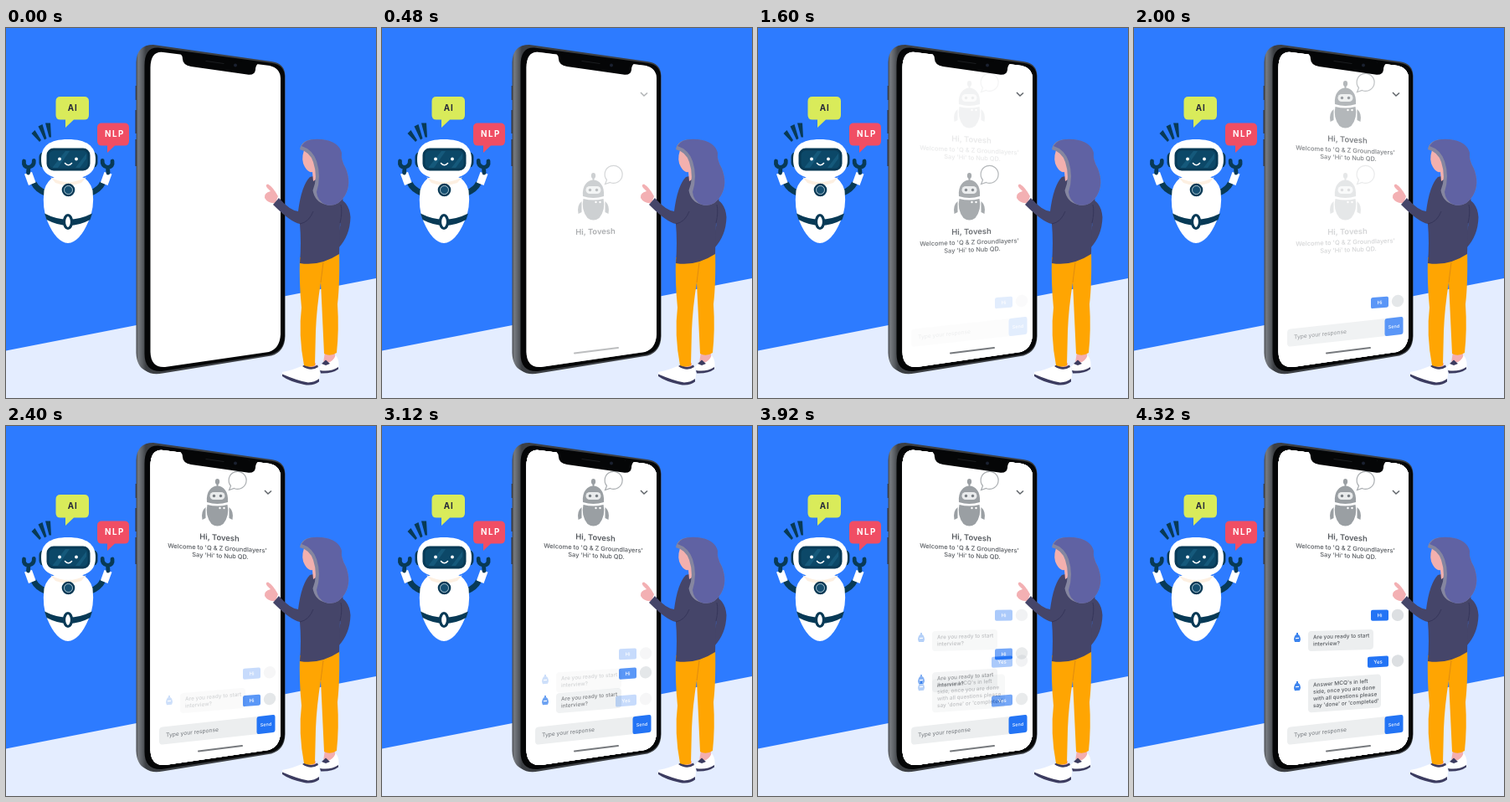
Write an HTML page that moves like this. It is 442 by 442 pixels and loops after 4.4 s.

```html
<!DOCTYPE html>
<html lang="en">
<head>
<meta charset="utf-8">
<title>Chat assistant</title>
<style>
html, body { margin: 0; width: 100%; height: 100%; overflow: hidden; background: #2d7bff; }
svg { display: block; width: 100%; height: 100%; }
text { font-family: Inter, "Open Sans", sans-serif; }
</style>
</head>
<body>
<svg viewBox="0 0 442 442">
  <defs>
    <linearGradient id="side" gradientUnits="userSpaceOnUse" x1="155" x2="167">
      <stop offset="0" stop-color="#3a3d41"/>
      <stop offset=".25" stop-color="#777b80"/>
      <stop offset=".65" stop-color="#5b5f64"/>
      <stop offset="1" stop-color="#3c3f43"/>
    </linearGradient>
  </defs>

  <rect width="442" height="442" fill="#2d7bff"/>
  <path d="M0 385.500L442 299V442H0Z" fill="#e4edff"/>

  <!-- speech tags -->
  <path d="M65 82H93.500Q99 82 99 87.500V104Q99 109.500 93.500 109.500H81L71 119V109.500H65Q59.500 109.500 59.500 104V87.500Q59.500 82 65 82Z" fill="#d9eb5a"/>
  <text x="79.800" y="99.300" font-size="9.800" font-weight="700" fill="#26283a" text-anchor="middle" letter-spacing="1">AI</text>
  <path d="M114.500 113.500H141.500Q147 113.500 147 119V135Q147 140.500 141.500 140.500H130L121 149V140.500H114.500Q109 140.500 109 135V119Q109 113.500 114.500 113.500Z" fill="#f04e64"/>
  <text x="129.900" y="130.400" font-size="9.800" font-weight="700" fill="#fff" text-anchor="middle" letter-spacing="1.400">NLP</text>

  <!-- white robot -->
  <path d="M30.500 126L34.500 122L42 134L40 136ZM38.500 117.500L43.500 115L48.500 132L46 133.500ZM47 113.500H53L54 130.500H51.500Z" fill="#083a56"/>
  <g id="arm">
    <path d="M33 185Q37 193 47 197" fill="none" stroke="#083a56" stroke-width="7"/>
    <path d="M22 174.500L31 172L35.500 184.500L27 188Z" fill="#fff"/>
    <path d="M26.500 173L27 167M21.500 159Q20.500 165.500 27 166.500Q34 165 33.300 158.500" fill="none" stroke="#083a56" stroke-width="4.800" stroke-linecap="round"/>
  </g>
  <use href="#arm" transform="matrix(-1 0 0 1 148.500 0)"/>
  <path d="M60 177H89Q100 181 103.500 194Q106 216 98.500 231Q88 256 74 257Q60 256 49.500 231Q43 216 45.500 194Q49 181 60 177Z" fill="#fff"/>
  <path d="M53 178Q74 190 96 178L90 185Q74 191 59 185Z" fill="#fdf0e2"/>
  <path d="M46 221.500Q74 236 103 221.500L100.500 229Q75 243 48.500 229Z" fill="#083a56"/>
  <ellipse cx="74" cy="231.500" rx="4.500" ry="8" fill="#fff" stroke="#083a56" stroke-width="3.200"/>
  <circle cx="74.500" cy="193.500" r="7.800" fill="#083a56"/>
  <circle cx="74.500" cy="193.500" r="5" fill="#164f70" stroke="#a9c4d1" stroke-width="1"/>
  <rect x="39.500" y="148" width="70" height="19" rx="6" fill="#083a56"/>
  <path d="M74 133C96 133 107 141 107 157C107 173 97 180 74 180C51 180 42 173 42 157C42 141 52 133 74 133Z" fill="#fff"/>
  <rect x="50" y="145" width="49" height="24" rx="7" fill="#0c4868" stroke="#083a56" stroke-width="3"/>
  <path d="M56 166L71 147H76L62 167H56ZM83 167L96 150V156L88 167Z" fill="#2b83a6" opacity=".3"/>
  <g fill="#fff"><circle cx="64" cy="156.500" r="1.900"/><circle cx="84" cy="156.500" r="1.900"/></g>
  <path d="M70.500 161.500Q74.500 166 78.500 161.500" fill="none" stroke="#fff" stroke-width="1.600" stroke-linecap="round"/>

  <!-- phone -->
  <path d="M154.700 69H158V86H154.700ZM154.500 98H158V126H154.500ZM154.500 133H158V165H154.500Z" fill="#303338"/>
  <path d="M155.500 41Q156 20 176 20L317 40Q333 42 333.500 57V368Q333 387 317 391.500L187 412.500Q174 415 166 409Q156 404 155.500 388Z" fill="url(#side)"/>
  <path d="M165.500 45Q165.500 22.500 182 23.500L318 42Q332.500 44 333 58V368Q332 386 316 390L186 410Q165.500 411 165.500 389Z" fill="#050607"/>
  <g id="screen"></g>
  <path d="M208 30L301 42.500Q298 45 298 50Q297 57 288 55.500L221 46Q211 44 211 37Q211 33.500 208 30Z" fill="#050607"/>
  <path d="M239 39.500L260 42.500" stroke="#1b1d20" stroke-width="1.200" stroke-linecap="round"/>
  <circle cx="274" cy="44.500" r="2" fill="#1b2130"/>

  <!-- woman -->
  <path d="M394 203Q410 206 411.500 226Q411 248 397 263L391 256Q401 242 399 229Z" fill="#454569"/>
  <path d="M358 401L357 412H370L370 400ZM381 387L379 400H393L393 387Z" fill="#f3aeb0"/>
  <path d="M374 405L380 398Q388 403 394 391Q399 398 397 407Q390 413 376 411Z" fill="#fff"/>
  <path d="M375 409Q388 411 397 405V407.500Q390 413 376 412.500ZM377 401L382 396.500L387 401L382 403Z" fill="#3c3c60"/>
  <path d="M330 411Q345 408 355 403Q365 410 373 403Q377 415 373 423Q366 428 355 425Q340 422 330 415Z" fill="#fff"/>
  <path d="M330 413.500Q350 422 361 423.500Q369 423 374 419V422.500Q367 428 356 426Q338 422 330 416ZM354 404L358 401.500Q363 408 372 402.500L373 405Q364 411 354 404Z" fill="#3c3c60"/>
  <path d="M351 274L398 264Q399 304 396 330Q398 360 395 388Q387 393 380 389L376 304Q371 335 370 362L369 403Q363 406 356 403Q349 366 353 334Q350 304 351 274Z" fill="#ffa502"/>
  <path d="M376 304L379 280" stroke="#df8b10" stroke-width="1"/>
  <path d="M325 201Q319 190 313 186.500Q309 187 312 191L316 195Q308 197 309 203Q313 210 322 209Z" fill="#f3b0b3"/>
  <path d="M363 178Q381 173 400 196Q406 210 399 233L398 270Q375 285 351 281Q353 256 351 234Q340 232 319 211L326 203Q339 218 349 219Q353 188 363 178Z" fill="#454569"/>
  <path d="M351 234Q362 232 367 219M399 233Q402 220 400 211" fill="none" stroke="#36365a" stroke-width="1"/>
  <path d="M356 146Q352 158 357 166Q361 173 366 172L367 183L378 176L375 145Z" fill="#f3b0ae"/>
  <path d="M351 145Q353 132 372 133Q393 133 400 147Q400 158 406 168Q413 186 405 200Q396 215 382 211Q369 208 366.500 194Q373 178 367 160Q363 148 351 145Z" fill="#8586a0"/>
  <path d="M353 141Q358 131 377 133Q397 135 401 149Q400 158 406 168Q413 186 405 200Q396 215 382 211Q372 207 371 196Q377 177 371 159Q366 145 353 141Z" fill="#6062a3"/>
</svg>
<script>
const STEP = 80, LOOP = 4400, STAGE = 9, FADE = 8;
const BLUE = '#2374f5', INK = '#565a5f';
const screen = document.getElementById('screen');

const rect = (x, y, w, h, r, fill) =>
  `<rect x="${x}" y="${y}" width="${w}" height="${h}" rx="${r}" fill="${fill}"/>`;
const label = (x, y, size, str, fill = INK, weight = 500, anchor = 'start') =>
  `<text x="${x}" y="${y}" font-size="${size}" fill="${fill}" font-weight="${weight}" text-anchor="${anchor}">${str}</text>`;

// Rows tilt with height, following the phone's perspective.
const tilt = (x, y, body) =>
  `<g transform="matrix(1 ${(213 - y) * 0.00075} 0 1 ${x} ${y})">${body}</g>`;

const glass = `<path d="M172.500 47Q173 27 188 29L315 45Q327.500 48 328 60V366Q327 383 314 387L190 405Q173 406 172.500 387Z" fill="#fff"/>`;
const frame =
  `<path d="M309 77L313 81L317 77.500" fill="none" stroke="#60656a" stroke-width="1.500"/>
   <path d="M230 388.500L282 382" stroke="#777a7e" stroke-width="2" stroke-linecap="round"/>`;

const mascot = y => `<g transform="translate(252.500 ${y})">
  <g fill="#9a9fa3">
    <ellipse cy="-28.500" rx="2.600" ry="3.400"/>
    <path d="M-1-26H1V-21H-1ZM-12.500-4C-15-30 15-30 12.500-4Q0 0-12.500-4Z"/>
    <path d="M-12-1Q0 2 12-1Q15 12 7 22Q0 27-7 22Q-15 12-12-1ZM-14 2V15L-18 17Q-20 7-14 2ZM14 2V15L18 17Q20 7 14 2Z"/>
  </g>
  ${rect(-9, -16, 18, 9, 4.5, '#e9ebec')}
  <g fill="#777d82"><circle cx="-4" cy="-11.500" r="1.700"/><circle cx="4" cy="-11.500" r="1.700"/></g>
  <g fill="#fff"><circle cx="3" cy="3" r="1.200"/><circle cx="8" cy="3" r="1.200"/></g>
  <path d="M16-23.500A10.500 10.500 0 1 1 20-20.500L14-18.500Z" fill="none" stroke="#a9adb0" stroke-width="1.200"/></g>`;

const greet = y => tilt(255, y + 40, label(0, 1.5, 9.4, 'Hi, Tovesh', INK, 600, 'middle'));
const welcome = y =>
  tilt(252.5, y + 52, label(0, 1.5, 7.5, "Welcome to 'Q &amp; Z Groundlayers'", INK, 500, 'middle')) +
  tilt(256, y + 61, label(0, 1.5, 7.4, "Say 'Hi' to Nub QD.", INK, 500, 'middle'));
const intro = y => mascot(y) + greet(y) + welcome(y);

const reply = (y, str, w) => tilt(304, y,
  rect(-w, -6.5, w, 13, 2, BLUE) +
  label(-w / 2, 2.2, 6, str, '#fff', 500, 'middle') +
  `<circle cx="11" cy="0" r="7.200" fill="#dcdfe2"/>`);

const message = (y, w, lines) => tilt(195, y,
  `<path d="M-4 2Q-3.500-3-1-4V-6H1V-4Q3.500-3 4 2L3 5H-3Z" fill="#3b83ee"/><path d="M-2 .5H2" stroke="#fff" stroke-width="1.300"/>` +
  rect(13, -7.5, w, 8 * lines.length + 8, 4, '#eceeef') +
  lines.map((s, i) => label(19, 2 + 8.2 * i, 6.5, s)).join(''));
const question = y => message(y, 78, ['Are you ready to start', 'interview?']);
const answer = y => message(y, 87, ["Answer MCQ's in left", 'side, once you are done',
  'with all questions please', "say 'done' or 'completed'"]);

const input = tilt(183, 359,
  rect(0, 1, 138, 21, 4, '#eceeef') + rect(116.5, 1, 22, 21, 2.5, BLUE) +
  label(8, 13.5, 6.7, 'Type your response', '#74797e', 400) +
  label(127.5, 13.5, 5.4, 'Send', '#fff', 500, 'middle'));

const chat = frame + intro(95) + input;
const stages = [
  '',
  `<g opacity=".78">${frame + mascot(205) + greet(205)}</g>`,
  frame + intro(205),
  chat + reply(327, 'Hi', 21),
  chat + reply(295, 'Hi', 21) + question(328),
  chat + reply(272, 'Hi', 21) + question(303) + reply(327, 'Yes', 25),
  chat + reply(226, 'Hi', 21) + question(253) + reply(281, 'Yes', 25) + answer(311)
];
screen.innerHTML = stages.map(s => `<g>${glass}${s}</g>`).join('');
const layers = [...screen.children];

// Each stage dissolves over the one before it, in eight even steps.
function draw(ms) {
  const step = Math.floor((ms % LOOP) / STEP);
  layers.forEach((layer, i) => {
    const p = i ? (step - STAGE * (i - 1) - 1) / FADE : 1;
    layer.setAttribute('opacity', Math.min(1, Math.max(0, p)));
  });
}

const start = performance.now();
function tick() {
  draw(performance.now() - start);
  requestAnimationFrame(tick);
}
tick();
</script>
</body>
</html>
```
